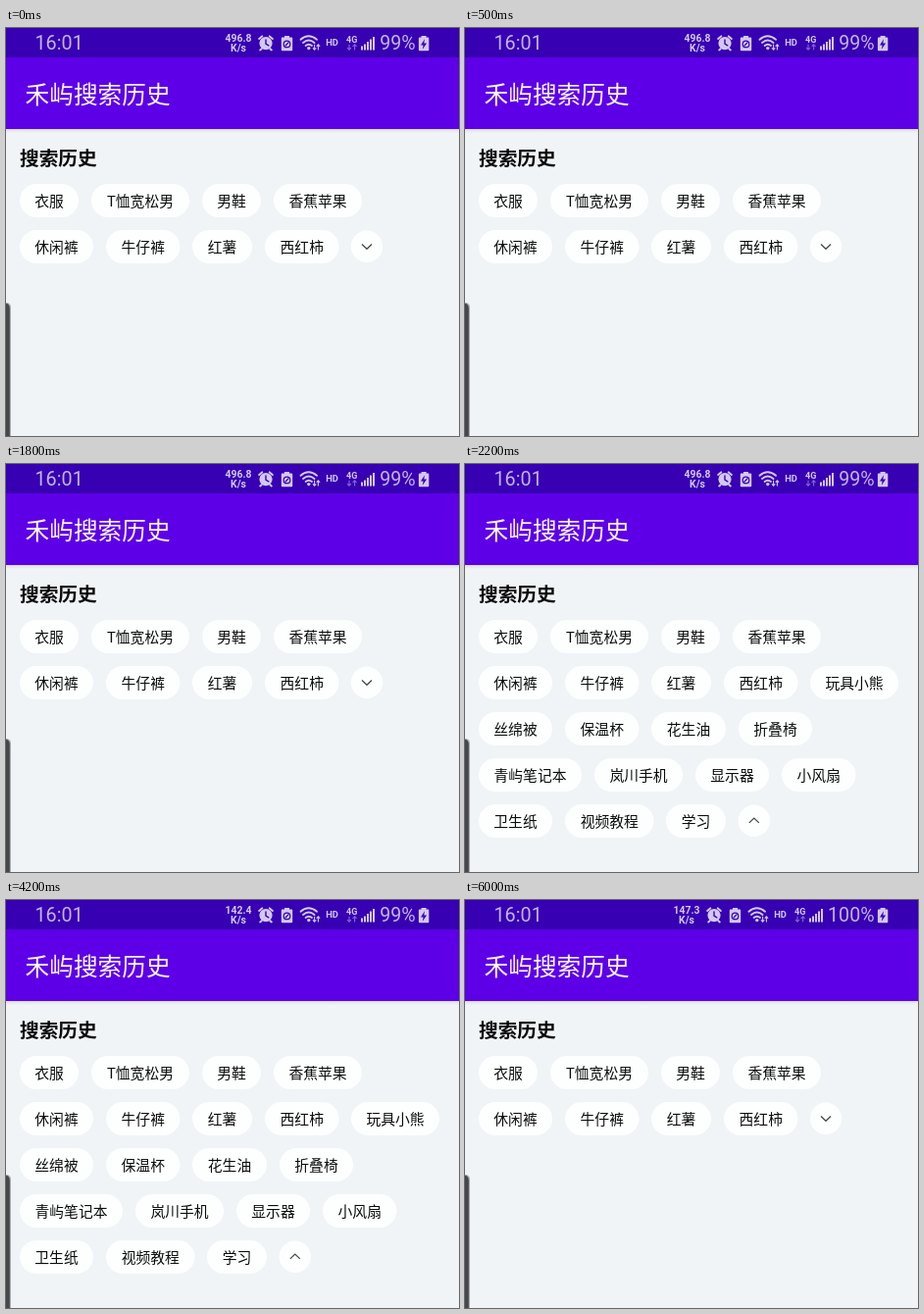
These frames come from a looping animation (462x416 px, 6100 ms). An HTML page:

```html
<!DOCTYPE html>
<html lang="zh-CN">
<head>
<meta charset="utf-8">
<title>搜索历史</title>
<style>
html, body { margin: 0; width: 100%; height: 100%; overflow: hidden; background: #f0f4f7; }
svg { display: block; width: 100%; height: 100%; font-family: Roboto, "Noto Sans CJK SC", "Noto Sans CJK", sans-serif; }
.cjk { font-family: "Noto Sans CJK SC", "Noto Sans CJK", sans-serif; }
.chip { font-size: 14.8px; text-anchor: middle; fill: #0c0c0c; }
.tiny { font-weight: 700; text-anchor: middle; }
.line { fill: none; stroke: #d3c8ee; stroke-linecap: round; }
.cut { fill: none; stroke: #3700b3; stroke-linecap: round; stroke-linejoin: round; }
</style>
</head>
<body>
<svg viewBox="0 0 462 416">
  <defs>
    <linearGradient id="shade" x2="0" y2="1">
      <stop offset="0" stop-color="#8d8f9c" stop-opacity=".22"/>
      <stop offset="1" stop-color="#8d8f9c" stop-opacity="0"/>
    </linearGradient>
  </defs>
  <rect width="462" height="416" fill="#f0f4f7"/>
  <rect y="103" width="462" height="4" fill="url(#shade)"/>
  <rect y="30" width="462" height="73" fill="#5e00e7"/>
  <rect width="462" height="30" fill="#3700b3"/>

  <g fill="#d3c8ee">
    <text x="29.5" y="22" font-size="19.8" fill="#c2b4e6">16:01</text>
    <g id="icons">
      <text id="speed" class="tiny" x="237" y="14.3" font-size="10.4"></text>
      <text class="tiny" x="237" y="23.8" font-size="10.4">K/s</text>

      <circle cx="265" cy="15.6" r="6.6"/>
      <path class="line" stroke-width="2" d="M258.2 11l3-2.6M271.8 11l-3-2.6M260.6 21.2l-1.4 1.2M269.4 21.2l1.4 1.2"/>
      <path class="cut" stroke-width="1.4" d="M265 12v4.2l2.8 1.6"/>

      <path d="M284 8h5v1.6h2.2q1 0 1 1v11.6q0 1-1 1h-9.4q-1 0-1-1V10.6q0-1 1-1H284z"/>
      <circle class="cut" cx="286.5" cy="16.4" r="3.3" stroke-width="1.2"/>
      <path class="cut" stroke-width="1.2" d="M285 18l3-3.2"/>

      <path class="line" stroke-width="1.9" d="M300.5 11.8q8-7 16.5 0M303 15q5.8-5 11.500 0M305.6 18q3.2-2.6 6.4 0"/>
      <circle cx="308.8" cy="20.6" r="1.7"/>
      <path class="line" stroke-width="1.1" d="M314.6 17v5M313.2 20.6l1.4 1.6 1.4-1.6M318.4 22v-5M317 18.4l1.4-1.6 1.4 1.6"/>

      <text class="tiny" x="332.5" y="18.3" font-size="9.4">HD</text>
      <text class="tiny" x="352.7" y="15" font-size="9">4G</text>
      <path class="line" stroke-width="1.1" opacity=".5" d="M350 17v5M348.3 20.4l1.700 1.8 1.7-1.8M355.6 22v-5M353.9 18.6l1.7-1.8 1.7 1.8"/>
      <path d="M362 18.5h2v4h-2zM365 16.5h2v6h-2zM368 14h2v8.5h-2zM371 11.5h2v11h-2zM374 9h2v13.5h-2z"/>
    </g>
    <text id="level" x="417.5" y="22" font-size="19.6" text-anchor="end" fill="#c2b4e6"></text>
    <path d="M423.6 8h5v1.6h1.7q1 0 1 1v11.6q0 1-1 1h-8.4q-1 0-1-1V10.6q0-1 1-1h1.7z"/>
    <path d="M427 11.2l-4 6.2h2.6l-.8 4.4 4.300-6.3h-2.8z" fill="#3700b3"/>
  </g>

  <text class="cjk" x="19.5" y="77" font-size="24.7" fill="#fbf8ff">禾屿搜索历史</text>
  <text class="cjk" x="14" y="140" font-size="19.7" font-weight="700" fill="#0a0a0a">搜索历史</text>

  <g id="base"></g>
  <g id="more"></g>
  <g id="toggle">
    <circle r="16.2" fill="#fdfffe"/>
    <path id="arrow" d="M-5-2.2L0 2.6 5-2.2" fill="none" stroke="#4a4a4a" stroke-width="1.3"/>
  </g>

  <path d="M0 280h1.5q3.5 1 3.5 5V416H0z" fill="#a9acb0"/>
  <path d="M0 281h1q2.8 1 2.8 5V416H0z" fill="#46474a"/>
</svg>
<script>
const LOOP = 6100;
const ROW_TOP = 159, ROW_STEP = 47, CHIP_H = 34;
const $ = id => document.getElementById(id);

// row, left edge, width, label
const baseChips = [
  [0, 14, 60, '衣服'], [0, 87, 100, 'T恤宽松男'], [0, 200, 60, '男鞋'], [0, 273, 90, '香蕉苹果'],
  [1, 14, 75, '休闲裤'], [1, 102, 75.5, '牛仔裤'], [1, 190, 61, '红薯'], [1, 264, 75.5, '西红柿']
];
const moreChips = [
  [1, 352, 90, '玩具小熊'],
  [2, 14, 75, '丝绵被'], [2, 102, 75.5, '保温杯'], [2, 190, 76, '花生油'], [2, 279, 75, '折叠椅'],
  [3, 14, 105, '青屿笔记本'], [3, 132, 90, '岚川手机'], [3, 235, 75, '显示器'], [3, 323, 75.5, '小风扇'],
  [4, 14, 75, '卫生纸'], [4, 102, 90.5, '视频教程'], [4, 205, 61, '学习']
];

// start time, open, speed, battery level
const steps = [
  [0, false, '496.8', 99],
  [2000, true, '496.8', 99],
  [2400, true, '142.4', 99],
  [4700, false, '142.4', 100],
  [6000, false, '147.3', 100]
];

function add(parent, tag, attrs, text = '') {
  const el = document.createElementNS(parent.namespaceURI, tag);
  for (const key in attrs) el.setAttribute(key, attrs[key]);
  el.textContent = text;
  parent.appendChild(el);
}

function addChips(parent, chips) {
  for (const [row, x, width, label] of chips) {
    const y = ROW_TOP + row * ROW_STEP;
    add(parent, 'rect', { x, y, width, height: CHIP_H, rx: CHIP_H / 2, fill: '#fdfffe' });
    add(parent, 'text', { class: 'chip', x: x + width / 2, y: y + 23 }, label);
  }
}

function show([, open, speed, level]) {
  $('more').setAttribute('visibility', open ? 'visible' : 'hidden');
  $('toggle').setAttribute('transform', open ? 'translate(294.8 363.7)' : 'translate(368 222.7)');
  $('arrow').setAttribute('transform', open ? 'scale(1 -1)' : '');
  $('speed').textContent = speed;
  $('level').textContent = level + '%';
  $('icons').setAttribute('transform', level > 99 ? 'translate(-11 0)' : '');
}

addChips($('base'), baseChips);
addChips($('more'), moreChips);

const start = performance.now();
let current;
function frame() {
  const t = (performance.now() - start) % LOOP;
  const step = steps.filter(s => s[0] <= t).pop();
  if (step !== current) show(current = step);
  requestAnimationFrame(frame);
}
frame();
</script>
</body>
</html>
```
